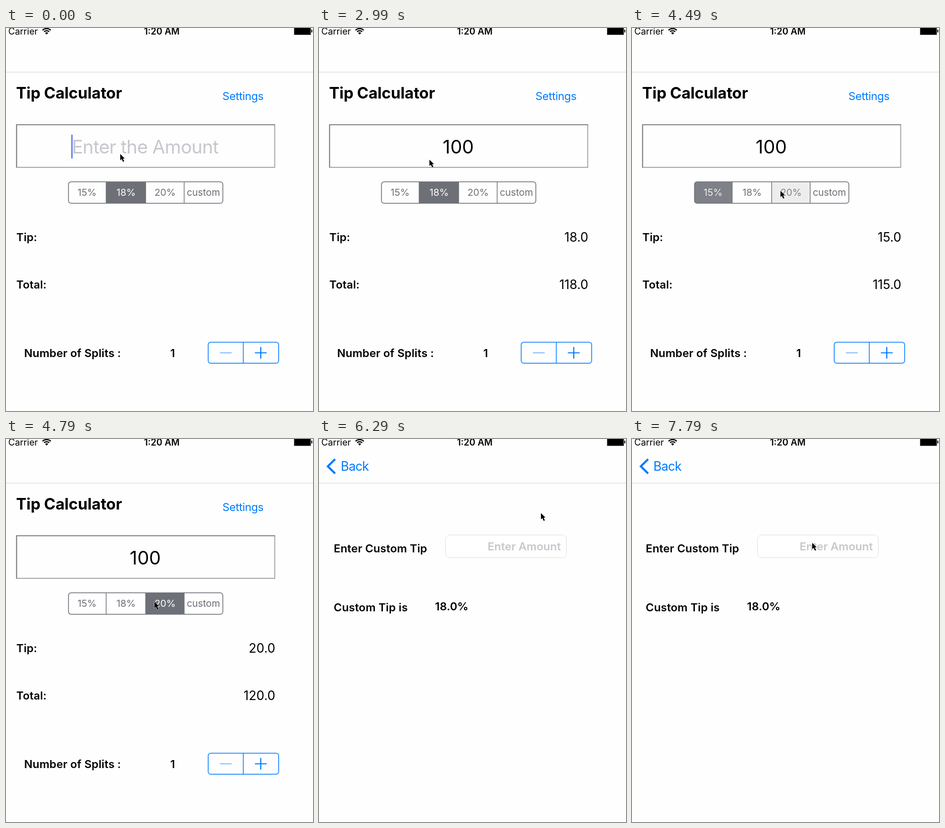
Animation of 610x760 px, one loop 8000 ms. Source, as an HTML page:

```html
<!DOCTYPE html>
<html lang="en">
<head>
<meta charset="utf-8">
<title>Tip Calculator</title>
<style>
  html, body { margin: 0; width: 100%; height: 100%; overflow: hidden; background: #fefefe; }
  svg { display: block; width: 610px; height: 760px; }
  text { font-family: Inter, "Noto Sans", sans-serif; font-size: 22px; font-optical-sizing: none; white-space: pre; }
  .bold { font-weight: 600; letter-spacing: .12px; }
  .title { font-size: 31px; font-weight: 700; letter-spacing: -.1px; }
  .amount { font-size: 37px; text-anchor: middle; }
  .seg { font-size: 19px; text-anchor: middle; }
  .value { font-size: 25px; text-anchor: end; }
  .status { font-size: 18px; letter-spacing: 0; }
  .link { fill: #007aff; letter-spacing: -.4px; }
  .hint { fill: #c7c7cd; }
  .blue { fill: none; stroke: #007aff; }
  #prompt { letter-spacing: -.78px; }
  #back { font-size: 25px; letter-spacing: -.7px; }
</style>
</head>
<body>
<svg viewBox="0 0 610 760">
  <defs>
    <clipPath id="pill"><rect x="124.5" y="305.5" width="306" height="42" rx="5"/></clipPath>
    <linearGradient id="shade"><stop stop-opacity="0"/><stop offset="1" stop-opacity=".07"/></linearGradient>
  </defs>
  <rect width="610" height="760" fill="#fefefe"/>

  <g id="calc">
    <text class="title" x="20" y="139.5">Tip Calculator</text>
    <text class="link" id="settings" x="430" y="143">Settings</text>
    <path d="M534 191V276.5H20" fill="none" stroke="#8a8a8c" stroke-width="1.4"/>
    <path d="M21 277V192H534.5" fill="none" stroke="#858587" stroke-width="2.2"/>
    <text class="amount hint" id="prompt" x="276.5" y="249">Enter the Amount</text>
    <text class="amount" id="amount" x="276.7" y="249"></text>
    <rect id="caret" y="211.5" width="3" height="47.5" rx="1.2" fill="#4a6cf0"/>
    <g id="segs" clip-path="url(#pill)"></g>
    <path d="M199 305V348M277.5 305V348M354 305V348" stroke="#6d6f77" stroke-width="1.4"/>
    <rect x="124.2" y="305.2" width="306.6" height="42.6" rx="5" fill="none" stroke="#6d6f77" stroke-width="1.5"/>
    <text class="bold" x="20.5" y="423">Tip:</text>
    <text class="bold" x="20.5" y="516.5">Total:</text>
    <text class="value" id="tip" x="535" y="424"></text>
    <text class="value" id="total" x="535" y="518"></text>
    <text class="bold" x="36" y="652.5">Number of Splits :</text>
    <text class="bold" x="326.5" y="652.5">1</text>
    <g class="blue" stroke-width="1.5">
      <rect x="401.7" y="623.5" width="140" height="41.8" rx="5"/>
      <path d="M471.5 623V665"/>
      <path d="M425 644.5H448.5" stroke-width="2" opacity=".5"/>
      <path d="M494.5 644.5H518M506.2 633V656" stroke-width="2.2"/>
    </g>
  </g>
  <rect id="dim" y="88" width="610" height="672"/>

  <g id="custom">
    <rect x="-10" y="88" width="6" height="672" fill="url(#shade)"/>
    <rect x="-4" y="88" width="630" height="672" fill="#fefefe"/>
    <text class="bold" x="27.3" y="225">Enter Custom Tip</text>
    <rect x="249.5" y="190.5" width="240" height="45" rx="8" fill="#fff" stroke="#dfdfe1"/>
    <text class="hint" x="478.5" y="221" text-anchor="end" font-weight="600">Enter Amount</text>
    <text class="bold" x="27.3" y="342">Custom Tip is</text>
    <text class="bold" x="228.5" y="339.5">18.0%</text>
  </g>

  <rect id="navdim" height="87" fill="#f6f6f6"/>
  <path d="M0 87.5H610" stroke="#d3d3d5"/>
  <path id="chevron" class="blue" d="M32 40L17.5 54.2L32 68.5" stroke-width="4"/>
  <text class="link" id="back" x="42.5" y="63">Back</text>

  <text class="status" x="4.5" y="13">Carrier</text>
  <g fill="none" stroke="#000" stroke-width="2.3">
    <path d="M72.5 4.3A12 12 0 0 1 89 4.3M75.6 7.4A7.6 7.6 0 0 1 85.9 7.4"/>
    <path d="M80.75 13L77.7 9.8A4.3 4.3 0 0 1 83.8 9.8Z" fill="#000" stroke="none"/>
  </g>
  <text class="status bold" x="309.5" y="13" text-anchor="middle">1:20 AM</text>
  <path d="M572.5 0V13.5H605.5V0" stroke="#777"/>
  <rect x="606.5" y="3" width="2" height="6" rx="1"/>

  <path id="mouse" d="M0 0V12.5L2.9 10L5.4 15.6L7.8 14.5L5.3 9.1H9Z" stroke="#fff" stroke-width="1" paint-order="stroke"/>
</svg>
<script>
const LOOP = 8000, STEP = 150, WIDTH = 622;
const $ = id => document.getElementById(id);

// Each row starts with its time in ms.
const typed = [[0, ''], [1040, '1'], [1190, '10'], [1340, '100']];
const caretX = [129.5, 286, 298, 307.7];
const blink = [[0, .85], [150, 0], [450, .5], [590, 1], [1940, 0]];
const sums = [[0, 0], [1940, 18], [3740, 15], [4640, 20]];
const picks = [[0, 1, 1, 1], [3590, 1, 0, .12], [3740, 1, 0, .3], [3890, 1, 0, 1],
  [4490, 0, 2, .12], [4640, 0, 2, .3], [4790, 0, 2, 1]];
const path = [[0, 227, 250], [2840, 227, 250], [3440, 178.5, 322], [3890, 178.5, 322], [4190, 295, 323],
  [4940, 295, 323], [5690, 473, 136], [5990, 473, 136], [6290, 441, 147], [7040, 262, 336], [7790, 358, 206]];

const segments = [['15%', 124, 199, 161], ['18%', 199, 277.5, 238.5],
  ['20%', 277.5, 354, 316], ['custom', 354, 431, 392.3]];
$('segs').innerHTML = segments.map(([name, a, b, mid]) =>
  `<rect x="${a}" y="305" width="${b - a}" height="43"/><text class="seg" x="${mid}" y="333">${name}</text>`).join('');
const boxes = $('segs').querySelectorAll('rect');
const names = $('segs').querySelectorAll('text');

const rowAt = (table, t) => table.findLast(row => row[0] <= t);
const mix = (a, b, k) => `rgb(${a.map((v, i) => Math.round(v + (b[i] - v) * k))})`;
const WHITE = [254, 254, 254], GRAY = [110, 112, 120];
const set = (id, attrs) => {
  for (const key in attrs) $(id).setAttribute(key, attrs[key]);
};
const shift = (x, y = 0) => `translate(${x} ${y})`;

function mouseAt(t) {
  const i = path.findLastIndex(row => row[0] <= t);
  const a = path[i], b = path[i + 1] || a;
  const u = b === a ? 0 : (t - a[0]) / (b[0] - a[0]);
  const k = u * u * (3 - 2 * u);
  return [a[1] + (b[1] - a[1]) * k, a[2] + (b[2] - a[2]) * k];
}

// Critically damped push: 1 is off stage, 0 is settled.
function pushAt(t) {
  const w = Math.max(0, t - 5880) * .0193;
  return (1 + w) * Math.exp(-w);
}

function draw(now) {
  const t = now % LOOP;
  const tick = Math.max(0, Math.floor((t + 10) / STEP) * STEP - 10);

  const text = rowAt(typed, t)[1];
  $('amount').textContent = text;
  set('prompt', { opacity: text ? 0 : 1 });
  set('caret', { x: caretX[text.length], opacity: rowAt(blink, t)[1] });

  const tip = rowAt(sums, t)[1];
  $('tip').textContent = tip ? tip.toFixed(1) : '';
  $('total').textContent = tip ? (100 + tip).toFixed(1) : '';

  const [, from, to, p] = rowAt(picks, t);
  segments.forEach((_, i) => {
    const k = i === to ? p : i === from ? 1 - p : 0;
    boxes[i].setAttribute('fill', mix(WHITE, GRAY, k));
    names[i].setAttribute('fill', mix(GRAY, WHITE, k));
  });

  const s = pushAt(tick), done = 1 - s;
  set('settings', { opacity: tick >= 5840 ? .3 : 1 });
  set('calc', { transform: shift(-.3 * WIDTH * done) });
  set('dim', { opacity: .1 * done });
  set('custom', { transform: shift(WIDTH * s) });
  set('navdim', { width: WIDTH * s + 12, opacity: s > .01 && s < 1 ? 1 : 0 });
  set('back', { transform: shift(230 * s), opacity: done });
  set('chevron', { opacity: Math.max(0, 1 - 2.55 * s) });
  set('mouse', { transform: shift(...mouseAt(tick)) });
}

const start = performance.now();
function loop() {
  draw(performance.now() - start);
  requestAnimationFrame(loop);
}
loop();
</script>
</body>
</html>
```
